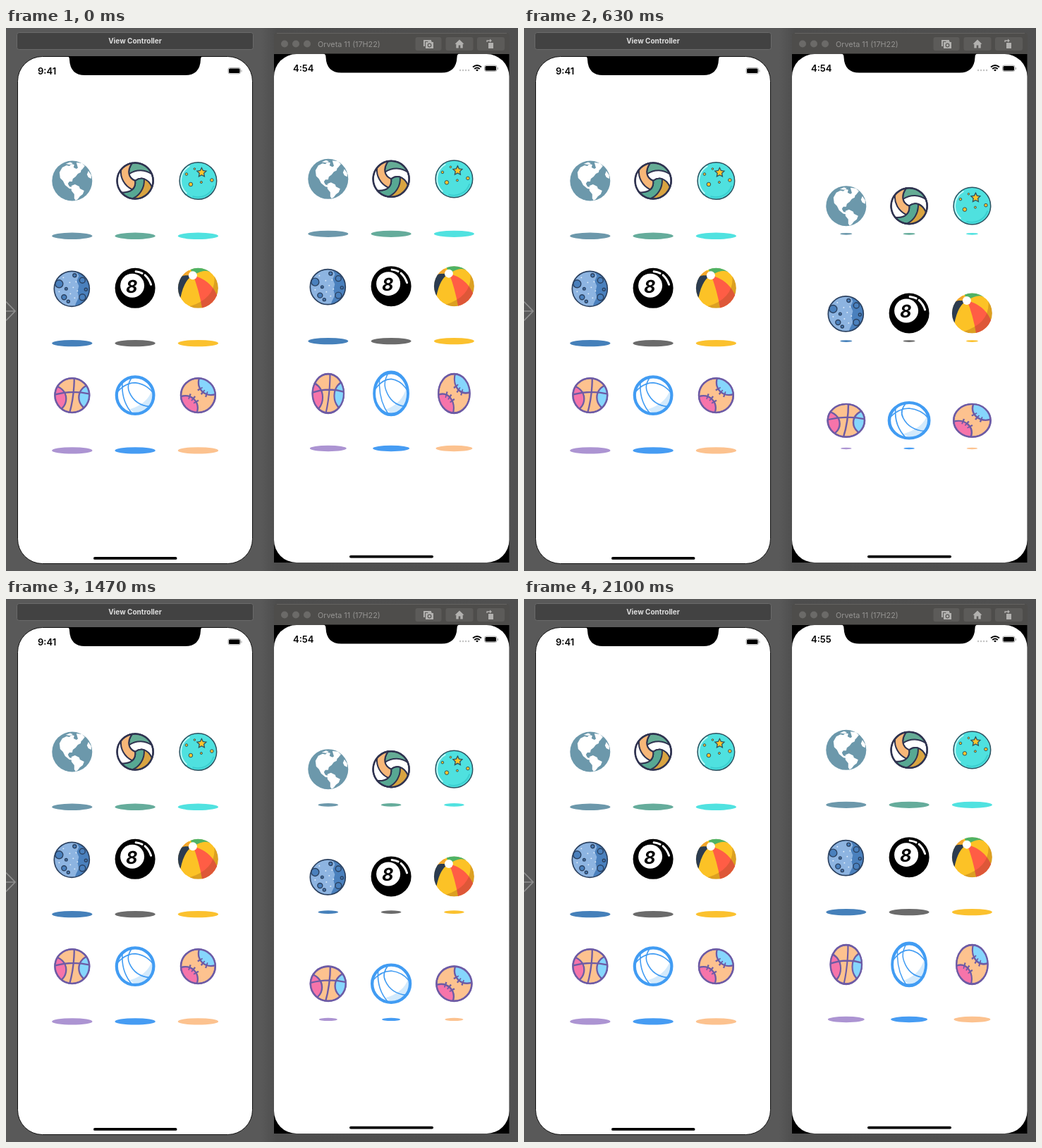
These frames come from a looping animation (726x771 px, 2170 ms). An HTML page:

```html
<!DOCTYPE html>
<html lang="en">
<head>
<meta charset="utf-8">
<title>Bouncing balls</title>
<style>
html, body { margin: 0; width: 100%; height: 100%; overflow: hidden; background: #595959; }
svg { display: block; font-family: Inter, "Liberation Sans", sans-serif; }
.clock { font-size: 13px; font-weight: 600; }
</style>
</head>
<body>
<svg id="stage" width="726" height="771" viewBox="0 0 726 771">
<defs>
  <linearGradient id="side">
    <stop offset="0" stop-color="#595959"/><stop offset=".06" stop-color="#4d4d4d"/><stop offset="1" stop-color="#505050"/>
  </linearGradient>
  <clipPath id="c25"><circle r="25"/></clipPath>
  <clipPath id="c28"><circle r="28.5"/></clipPath>

  <g id="top">
    <path d="M70 0q4 0 4 5q1 22 22 22h142q21 0 22-22q0-5 4-5z"/>
    <rect x="299" y="16.5" width="17.500" height="8.5" rx="2.5" fill="none" stroke="#aaa"/>
    <rect x="300" y="17.5" width="15.500" height="6.5" rx="1.5"/>
    <path d="M318 19.500v3" stroke="#aaa"/>
  </g>

  <g id="b0">
    <circle r="28.5" fill="#6c98ab"/>
    <path fill="#fff" d="M-18-12l4-7 6-3 4 1 3-3 4 1-1 4 4 2 3-2 4 3-1 4-4 2-3 4-4 3-1 4-4 0-2 3 2 4 3 1 2 3-5-1-6-5-3-6-4-4z
      M-9-24l6-2.500 4 1.500-4 2z M6-26l8 1 4 4-4 5-3 2-3-5z
      M-1 7l5-2 6 3 1 3 6 3-2 5-4 3-3 4-3 2-2-3v-6l-4-5z M23-14l4 6v5l-4-2-2-4z"/>
  </g>

  <g id="b1" stroke="#2f3350" stroke-width="2" stroke-linejoin="round">
    <g id="panels"></g>
    <circle r="25.5" fill="none" stroke-width="2.5"/>
  </g>

  <g id="b2" stroke="#2c5260">
    <circle r="26.3" fill="#4fe1df" stroke-width="1.5"/>
    <path d="M-16 18A24 24 0 0 1-12-21" fill="none" stroke="#c4f7f6" stroke-width="1.8"/>
    <path d="M-8 22A23.500 23.500 0 0 0 22 7" fill="none" stroke="#3bcfd0" stroke-width="2"/>
    <g fill="#fcc42c">
      <path d="M5-18.500l2 4 4.500.6-3.300 3.200.8 4.500-4-2.100-4 2.100.8-4.500-3.300-3.200 4.500-.6z" stroke-width="1.3"/>
      <circle cx="-16.5" cy="-9.5" r="1.8"/><circle cx="-10.5" cy="5" r="2.8"/>
      <circle cx="4.5" cy="2" r="1.5"/><circle cx="19.5" cy="-1" r="2.3"/><circle cx="-5" cy="-17" r="1.3"/>
    </g>
  </g>

  <g id="b3" transform="translate(-.5 1)">
    <circle r="25" fill="#8db4e1"/>
    <path clip-path="url(#c25)" fill="#4a80bd" d="M6-26l4 8-3 7 3 7-2 8 2 8-4 8-3 8h27v-54z"/>
    <g fill="#4a80bd" stroke="#2b4160" stroke-width="1.4">
      <circle cx="-18" cy="-7" r="5.5"/><circle cx="-11" cy="12" r="3.5"/><circle cx="15" cy="-12" r="4"/>
      <circle cx="15" cy="12" r="4.5"/><circle cx="4" cy="-19" r="2.5"/><circle cx="-8" cy="0" r="1.8"/>
      <circle cx="20" cy="1" r="2"/><circle cx="-5" cy="18" r="2"/>
    </g>
    <path d="M-12-16h.1M-3-9h.1M2-2h.1M-2 7h.1M4 13h.1M-18 4h.1M8 3h.1M6-10h.1" stroke="#e4f0fc" stroke-width="1.8" stroke-linecap="round"/>
    <circle r="25" fill="none" stroke="#2b4160" stroke-width="1.7"/>
  </g>

  <g id="b4">
    <circle r="28.5"/>
    <circle cx="-4" cy="-3.5" r="17" fill="#fff"/>
    <text x="-5" y="6.5" font-size="25" font-weight="700" text-anchor="middle" transform="skewX(-9)">8</text>
    <path d="M1-23.500Q6-23 10-21M14-18.500Q20-13 22.500-5" fill="none" stroke="#fff" stroke-width="3" stroke-linecap="round"/>
  </g>

  <g id="b5" clip-path="url(#c28)">
    <circle r="28.5" fill="#fcc226"/>
    <path d="M-7-18Q-20-12-25 14L-34 0-24-18z" fill="#2c3c50"/>
    <path d="M-7-18Q-18-20-24-16L-16-28z" fill="#f3a62b"/>
    <path d="M-7-18Q8-28 17-23L10-33-12-30z" fill="#4fb265"/>
    <path d="M-7-18Q1 2 6 30L32 22 26 8Q16-12-7-18z" fill="#ff5d45"/>
    <path d="M23-18Q26 14-12 26L0 34 34 24 34-10z" fill="#8a4818" opacity=".28"/>
    <circle cx="-7.5" cy="-18" r="6" fill="#fff"/>
  </g>

  <g id="b6" stroke="#6d5ba5" stroke-width="2.3" fill="none">
    <circle r="24.5" fill="#fdc28f"/>
    <g clip-path="url(#c25)">
      <circle cx="-27" cy="5" r="18.5" fill="#f674aa"/>
      <circle cx="28" cy="3" r="18.5" fill="#86d6fd"/>
      <path d="M3-26Q3 2-4 26M-25-1Q0-8 25-2"/>
    </g>
    <circle r="24.3"/>
  </g>

  <g id="b7" stroke="#419cf3" fill="none">
    <circle r="26.5" fill="#fff"/>
    <path d="M24-8Q18 12-8 20L2 26 18 20 26 6z" fill="#d3eafc" stroke="none"/>
    <path d="M-4-26Q-13-14-8-4Q0 14 21 16M-26-4Q-14-18 0-18Q16-16 25-4M-18-18Q-20 8-4 26" stroke-width="1.6"/>
    <circle r="26.3" stroke-width="4.2"/>
  </g>

  <g id="b8" stroke="#6d5ba5" stroke-width="2.3" fill="none">
    <circle r="24.5" fill="#fdc28f"/>
    <g clip-path="url(#c25)">
      <circle cx="-18" cy="18" r="17.500" fill="#f674aa"/>
      <circle cx="18" cy="-18" r="17.500" fill="#86d6fd"/>
      <g stroke-width="8" stroke-dasharray="2 4">
        <path d="M-13 1.200A17.500 17.500 0 0 1-1.200 13"/>
        <path d="M13-1.200A17.500 17.500 0 0 1 1.200-13"/>
      </g>
    </g>
    <circle r="24.3"/>
  </g>
</defs>

<rect width="726" height="771" fill="#595959"/>
<rect x="362" width="364" height="771" fill="url(#side)"/>
<path d="M0 388.500L13 402 0 415.500M0 402H12" fill="none" stroke="#8d8d8d" stroke-width="1.7"/>

<rect x="15.5" y="6.5" width="335" height="24" rx="3" fill="#424242" stroke="#6a6a6a"/>
<text x="183" y="22" font-size="10" font-weight="700" text-anchor="middle" fill="#dedede">View Controller</text>
<rect x="16.5" y="40.5" width="333" height="720" rx="35" fill="#fff" stroke="#111"/>
<use href="#top" x="16" y="40"/>
<rect x="124" y="751" width="118.500" height="3.800" rx="1.9"/>
<text class="clock" x="45" y="66">9:41</text>

<rect x="380" y="7" width="334" height="31" rx="4" fill="#4e4d4b"/>
<path d="M384 7.500H710" stroke="#646260"/>
<g fill="#6b6a68"><circle cx="395" cy="22.5" r="5"/><circle cx="411" cy="22.5" r="5"/><circle cx="427" cy="22.5" r="5"/></g>
<text x="442" y="26.500" font-size="10.800" fill="#959492">Orveta 11 (17H22)</text>
<g fill="#5c5b59">
  <rect x="580.5" y="13" width="37" height="19" rx="3"/><rect x="623.5" y="13" width="39" height="19" rx="3"/><rect x="668" y="13" width="39" height="19" rx="3"/>
</g>
<g fill="#b2b1af">
  <path d="M592 17h11v2h-9v7h-2z"/><path d="M595 20h3l1-1.500h4l1 1.500h2v9h-11z"/>
  <circle cx="600.5" cy="24.5" r="2.3" fill="none" stroke="#5c5b59" stroke-width="1.2"/>
  <path d="M643 16.500l6.500 6.300h-1.800v5.700h-3.400v-4h-2.600v4h-3.400v-5.700h-1.800z"/>
  <rect x="684" y="21" width="7" height="8"/>
  <path d="M682 20v-2h5" fill="none" stroke="#b2b1af" stroke-width="1.3"/><path d="M686 15.500l3 2.500-3 2.500z"/>
</g>
<rect x="380" y="37" width="333.5" height="722"/>
<rect x="380" y="37" width="333.5" height="722" rx="32" fill="#fff"/>
<use href="#top" x="379.5" y="36.5"/>
<rect x="487" y="748.700" width="119" height="3.800" rx="1.9"/>
<text class="clock" id="clock" x="407" y="61.5">4:54</text>
<path d="M644 60h.1M648 60h.1M652 60h.1M656 60h.1" stroke="#c4c4c4" stroke-width="2.4" stroke-linecap="round"/>
<path d="M662 55.500Q668 50.500 674 55.500M664.200 58Q668 55 671.800 58" fill="none" stroke="#000" stroke-width="1.9"/>
<path d="M666 59.500q2-1.500 4 0l-2 2z"/>
<g id="cells"></g>
</svg>

<script>
const NS = 'http://www.w3.org/2000/svg';
const LOOP = 2170, STEP = 70, PERIOD = 1050, LOWEST = 562, CLOCK_CHANGE = 1890;
const shades = ['#6c98ab', '#65ac9b', '#50e2e0', '#4580ba', '#6b6b6b', '#fbc12e', '#ac94d2', '#469cf3', '#fcc28f'];
const clock = document.getElementById('clock');

function add(parent, tag, attrs) {
  const el = document.createElementNS(NS, tag);
  for (const k in attrs) el.setAttribute(k, attrs[k]);
  return parent.appendChild(el);
}

// Three swirling pairs of volleyball panels
[['#65ac95', '#fff'], ['#d9a441', '#57a893'], ['#fff', '#f7b778']].forEach(([outer, inner], i) => {
  const g = add(document.getElementById('panels'), 'g', { transform: `rotate(${i * 120})` });
  const rim = 'A25.6 25.6 0 0 1 24 9C18-4 8-6 0 0';
  add(g, 'path', { fill: outer, d: `M0 0C-9.2-3.9-12.5-13.6-4.2-25.3${rim}z` });
  add(g, 'path', { fill: inner, d: `M-8.7-9.7C2-17 15-16 23.6-9.5${rim}C-4.5-2-8-5.5-8.7-9.7z` });
});

// Places a ball with its shadow; returns a function that poses it by fall progress
function cell(i, dx, dy) {
  const g = document.getElementById('cells');
  const x = 93.8 + 89.3 * (i % 3) + dx, row = Math.floor(i / 3), y = 217 + 152.3 * row + dy;
  const shadow = add(g, 'ellipse', { rx: 28.7, ry: 4.7, fill: shades[i] });
  const ball = add(g, 'use', { href: '#b' + i });
  const pose = (drop, sx, sy, size) => {
    ball.setAttribute('transform', `translate(${x} ${y + drop}) scale(${sx} ${sy})`);
    shadow.setAttribute('transform', `translate(${x} ${y + 78.3}) scale(${size})`);
  };
  pose(0, 1, 1, 1);
  return p => row < 2
    ? pose(55 * p, 1, 1, 1 - p)
    : pose(55 * p, .91 + .23 * p, 1.14 - .26 * p, .91 * (1 - p));
}

const movers = shades.map((_, i) => {
  cell(i, 0, 0);
  return cell(i, 363, -3);
});

function draw(now) {
  const t = Math.floor(now % LOOP / STEP) * STEP;
  const phase = (t - LOWEST + 2.5 * PERIOD) % PERIOD - PERIOD / 2;
  const fall = 1 - Math.abs(phase) / (PERIOD / 2);
  movers.forEach(move => move(.915 * fall ** 1.9));
  clock.textContent = t < CLOCK_CHANGE ? '4:54' : '4:55';
}

const start = performance.now();
function tick() {
  draw(performance.now() - start);
  requestAnimationFrame(tick);
}
tick();
</script>
</body>
</html>
```
